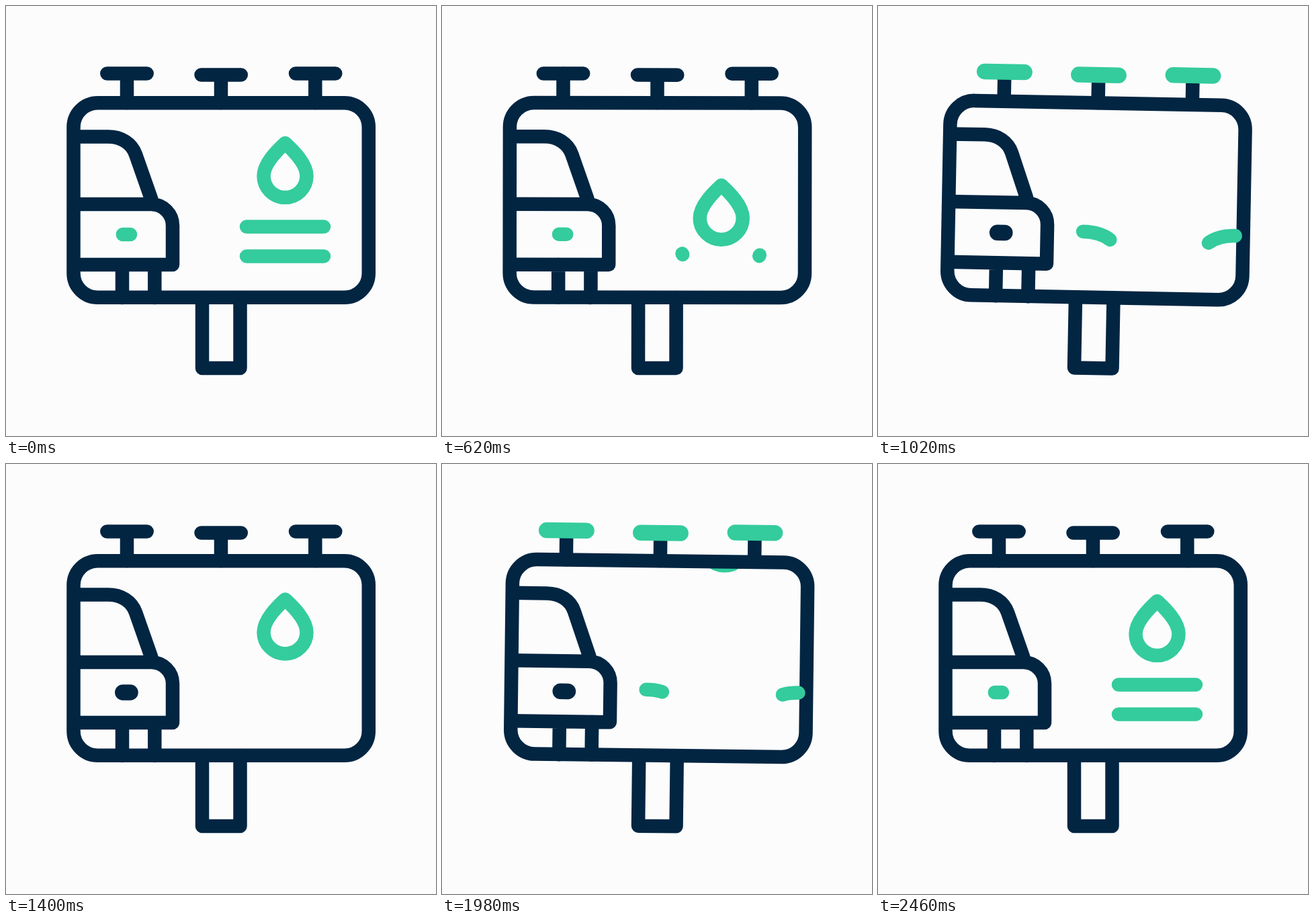
Write an HTML page with a canvas that moves like this. It is 640 px wide and 640 px high and loops after 2500 ms.

```html
<!DOCTYPE html>
<html lang="en">
<head>
<meta charset="utf-8">
<title>Billboard</title>
<style>
  html, body { margin: 0; width: 100%; height: 100%; overflow: hidden; background: #fcfcfc; }
  canvas { display: block; width: 100vw; height: 100vh; }
</style>
</head>
<body>
<canvas id="stage" width="640" height="640"></canvas>
<script>
const ctx = document.getElementById('stage').getContext('2d');
const NAVY = '#022542', GREEN = '#34cc9c', PAPER = '#fcfcfc';
const LOOP = 2500, CYCLE = 920, SECOND_START = 1500;
const LINE = 20.5, THICK = 23.5;

const progress = (t, a, b) => Math.min(1, Math.max(0, (t - a) / (b - a)));
const ease = (t, a, b) => {
  const u = progress(t, a, b);
  return u * u * (3 - 2 * u);
};

const board = new Path2D();
board.roundRect(100.5, 144.3, 439.3, 289.5, 36);
const post = new Path2D('M292 434V539H348.5V434');
const stems = new Path2D('M180 101V144M320 103V144M460.3 101V144');
const lamps = new Path2D('M150.3 100.6H209.7M290.5 102.6H349.8M431 100.6H490.3');
const truck = new Path2D(
  'M101 194.5H152C171 194.5 187 204 193 221L216.5 288' +
  'M101 295H216A32 32 0 0 1 248 327V385H101M173 385V434M221.3 385V434');
const headlight = new Path2D('M173.8 340H185');
const drop = new Path2D('M415.5 204C407 212 383.5 233 383.5 253A32 32 0 0 0 447.5 253C447.5 233 424 212 415.5 204Z');
const splashes = [
  new Path2D('M358 370C348 346 330 336 301 336'),
  new Path2D('M472 372C482 348 500 338 528 338')
];
const SPLASH_LENGTH = 71;

function stroke(path, color, width = LINE) {
  ctx.strokeStyle = color;
  ctx.lineWidth = width;
  ctx.stroke(path);
}

function drawDrop(t, phase) {
  let y, alpha = 1;
  const fade = 1 - progress(phase, 680, 785);
  if (t < 800) {
    y = 90 * ease(t, 450, 720);
    alpha = fade;
  } else if (t < 1370) {
    y = -170 + 164 * ease(t, 940, 1370);
  } else if (t < 1800) {
    y = -6 + 96 * ease(t, 1370, 1645);
    alpha = t < SECOND_START ? 1 : fade;
  } else {
    y = -170 + 170 * ease(t, 1870, 2250);
  }
  ctx.save();
  ctx.beginPath();
  ctx.rect(105, 150, 430, 280);
  ctx.clip();
  ctx.translate(0, y);
  ctx.globalAlpha = alpha;
  stroke(drop, GREEN);
  ctx.restore();
}

function drawTextLines(t) {
  const size = t < 1000 ? 1 - ease(t, 100, 450) : ease(t, 2100, 2400);
  if (size <= 0) return;
  const end = 358 + 115 * size;
  stroke(new Path2D(`M358 328.5H${end}M358 372.5H${end}`), GREEN);
}

function drawSplash(phase) {
  if (phase < 600 || phase > 1150) return;
  const head = SPLASH_LENGTH * ease(phase, 600, 840);
  const tail = SPLASH_LENGTH * ease(phase, 922, 1152);
  ctx.setLineDash([Math.max(0.1, head - tail), 200]);
  ctx.lineDashOffset = -tail;
  for (const path of splashes) stroke(path, GREEN);
  ctx.setLineDash([]);
}

function draw(t) {
  const phase = t < SECOND_START ? t : t - CYCLE;
  const tilt = 2 * (ease(phase, 590, 880) - ease(phase, 880, 1180));
  const lampsOn = phase >= 800 && phase < 1300;
  const headlightOff = phase >= 800 && phase < 1480;

  ctx.fillStyle = PAPER;
  ctx.fillRect(0, 0, 640, 640);
  ctx.save();
  ctx.lineCap = ctx.lineJoin = 'round';
  ctx.translate(320, 540);
  ctx.rotate(tilt * Math.PI / 180);
  ctx.translate(-320, -540);

  drawDrop(t, phase);
  for (const path of [post, stems, truck, board]) stroke(path, NAVY);
  stroke(lamps, lampsOn ? GREEN : NAVY, lampsOn ? THICK : LINE);
  stroke(headlight, headlightOff ? NAVY : GREEN, headlightOff ? THICK : LINE);
  drawTextLines(t);
  drawSplash(phase);
  ctx.restore();
}

const start = performance.now();
function frame() {
  draw((performance.now() - start) % LOOP);
  requestAnimationFrame(frame);
}
frame();
</script>
</body>
</html>
```
